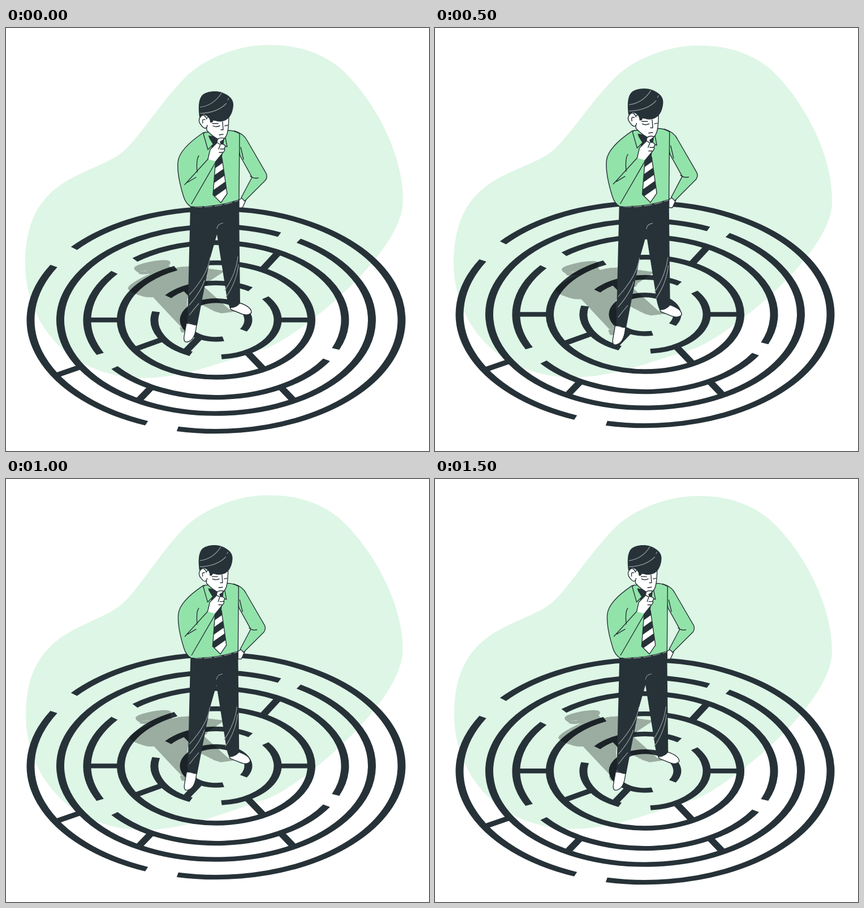
These frames come from a looping animation (748x748 px, 1540 ms). An HTML page:

```html
<!DOCTYPE html>
<html lang="en">
<head>
<meta charset="utf-8">
<title>Man in a maze</title>
<style>
  html, body { margin: 0; width: 100%; height: 100%; overflow: hidden; background: #fff; }
  svg { display: block; width: 100vw; height: 100vh; }
  path { stroke-linejoin: round; }
  .line, .skin, .shirt { stroke: #263238; stroke-width: 1.4; stroke-linecap: round; }
  .line, .crease { fill: none; }
  .skin { fill: #fff; }
  .shirt { fill: #92e3a9; }
  .dark { fill: #263238; }
  .crease { stroke: #939a9c; stroke-width: 1.2; }
  .shadow { filter: brightness(0) opacity(.3); }
</style>
</head>
<body>
<svg viewBox="0 0 748 748">
  <path id="blob" fill="#def6e6" d="M463 30C520 29 560 46 590 70C640 114 702 210 702 305S510 552 455 568S320 619 245 619C110 619 34 520 34 418S82 280 138 255S203 227 230 194S283 122 315 89S408 30 463 30"/>
  <path id="maze" fill="none" stroke="#263238" stroke-width="14"/>

  <g id="man">
    <!-- The shadow is the figure itself, laid flat on the floor. -->
    <use href="#figure" class="shadow" transform="matrix(1.017 -.243 .266 .251 -155.5 476)"/>
    <g id="figure">
      <path class="skin" d="M412 304L420 299L424 305L418 318H412Z"/>
      <path class="shirt" d="M404 182Q421 187 427 200L460 257Q463 263 459 269L422 306L416 300L435 264L414 226Z"/>

      <path class="skin" d="M319 522L337 524Q335 549 324 554T315 545Z"/>
      <path class="skin" d="M396 494L413 486Q434 493 434 503Q428 511 413 504L398 498Z"/>
      <path class="dark" d="M326 313L412 304L414 487Q406 496 396 495Q391 485 389 466L373 365L361 407L338 526Q327 526 321 519Z"/>
      <path class="crease" d="M384 345Q374 346 373 355"/>
      <path class="crease" id="creases"/>

      <path class="shirt" d="M349 185L392 181Q404 181 413 187L412 304Q370 318 327 316Q318 311 314 298Q302 260 304 237T349 185"/>
      <path class="crease" stroke-dasharray="14 4" d="M333 316Q370 319 411 305"/>
      <path class="line" d="M341 226Q336 232 338 255M415 211L420 232M316 277L357 232M321 273L336 264M328 311L372 235M432 262Q438 267 446 265"/>

      <path class="dark" d="M358 190L386 195L381 236H370Z"/>
      <path class="shirt" d="M353 184L349 187L357 215L366 206M388 194L391 210L384 208"/>
      <clipPath id="tie"><path d="M371 230H382L391 293L380 309L366 295Z"/></clipPath>
      <path class="skin" d="M371 230H382L391 293L380 309L366 295Z"/>
      <path id="stripes" clip-path="url(#tie)" stroke="#263238" stroke-width="11"/>

      <path class="skin" d="M354 160L355 181Q367 194 380 199Q388 197 391 187T394 153H365Z"/>
      <path class="skin" d="M355 161Q350 150 344 157T346 173T356 172"/>
      <path class="line" d="M352 162Q346 160 348 168M366 173Q371 176 378 173M387 173L392 172M383 166L384 180H380M377 189L384 188M365 169H375"/>
      <path class="dark" d="M342 158C340 142 340 128 346 120S371 110 382 114S402 125 402 135S398 160 386 164S371 163 366 164Q366 168 361 167Q361 156 349 153Z"/>
      <path class="crease" d="M343 151Q374 150 390 133M392 128L394 124M343 140Q367 137 381 115"/>

      <path class="skin" d="M357 232L361 215L373 203L374 197Q378 193 386 195Q384 199 379 201L380 205Q391 206 386 213Q388 216 384 220L371 236"/>
      <path class="line" d="M374 203L379 206L376 214M379 214H386M377 220H383"/>
    </g>
  </g>
</svg>
<script>
const LOOP = 1540, PERIOD = 1500, PHASE = 25, FPS = 24;
const $ = id => document.getElementById(id);
const trace = (id, d) => $(id).setAttribute('d', d);
const move = (id, transform) => $(id).setAttribute('transform', transform);
const repeat = (count, rule) => Array.from({ length: count }, (_, i) => rule(i)).join('');

// The maze is a flat plan of concentric walls, squashed vertically.
const [outer, second, third, fourth, fifth, core] = [328, 275.5, 228, 168.5, 109, 57];
const polar = (r, deg) => {
  const a = deg * Math.PI / 180;
  return `${r * Math.cos(a)} ${r * Math.sin(a)}`;
};
const wall = (r, from, to) =>
  `M${polar(r, from)}A${r} ${r} 0 ${+(to - from > 180)} 1 ${polar(r, to)}`;
const spoke = (deg, r1, r2) => `M${polar(r1, deg)}L${polar(r2, deg)}`;

trace('maze',
  wall(outer, 220, 462) + wall(outer, 112, 209) +
  wall(second, 302, 654) +
  wall(third, 31, 142) + wall(third, 154, 218) + wall(third, 231, 382) +
  wall(fourth, 261, 605) +
  wall(fifth, 219, 304) + wall(fifth, 323, 445) + wall(fifth, 114, 193) +
  wall(core, 77, 392) +
  spoke(150, outer, second) + spoke(120, second, third) + spoke(60, second, third) +
  spoke(180, third, fourth) + spoke(299, third, fourth) +
  spoke(0, fourth, fifth) + spoke(60, fourth, fifth) + spoke(149, fourth, fifth) +
  spoke(240, fifth, core) + spoke(120, fifth, core));

trace('stripes', repeat(3, i => `M360 ${248 + 25 * i}l34 -24`));
trace('creases',
  repeat(3, i => `M${361 - 10 * i} ${405 + 41 * i}Q${357 - 12 * i} ${436 + 30 * i} 324 ${472 + 18 * i}`) +
  repeat(2, i => `M${410 + i} ${404 + 14 * i}Q${407 + i} ${434 + 14 * i} ${387 + 2 * i} ${464 + 12 * i}`));

// Linear zigzag: 0 at turn 0, 1 at a quarter, -1 at three quarters.
const zigzag = turn => Math.asin(Math.sin(2 * Math.PI * turn)) * 2 / Math.PI;

function draw() {
  const frame = Math.min(36, Math.floor((performance.now() % LOOP + 5) * FPS / 1000));
  const time = frame * 1000 / FPS;
  const turn = (time + PHASE) / PERIOD;
  const lift = 7.48 * (1 + zigzag(turn - .25));
  // The figure grows and shrinks in coarse steps.
  const step = Math.round(1.087 * zigzag((time - 490) / LOOP + .25) - .174);

  move('blob', `rotate(${zigzag(turn)} 368 324)`);
  move('maze', `translate(371.5 ${516.8 - lift}) scale(1 .6)`);
  move('man', `translate(337.5 333) scale(${1 + .0225 * step}) translate(-337.5 -333)`);
  requestAnimationFrame(draw);
}
draw();
</script>
</body>
</html>
```
